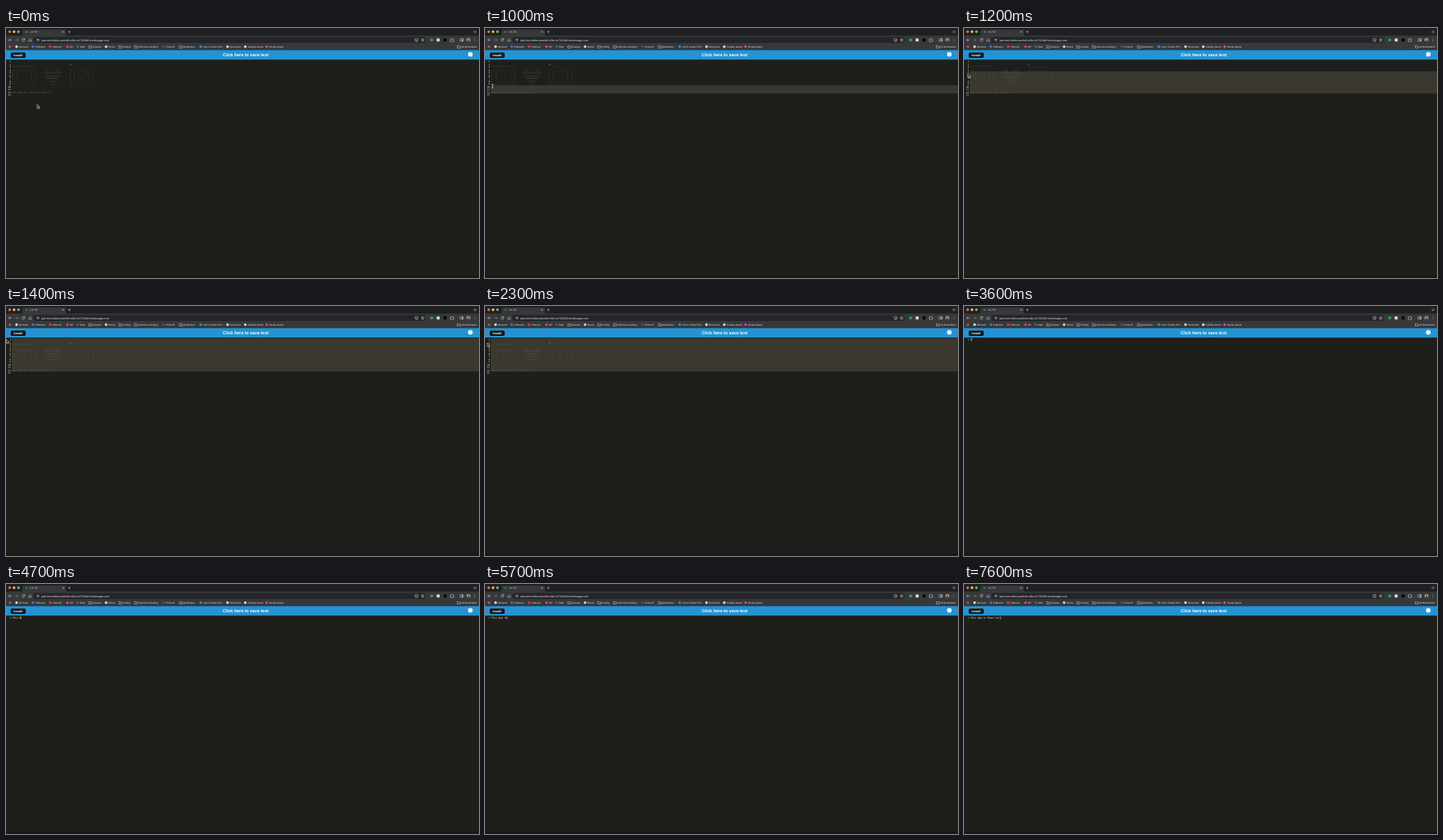
An HTML page for the animation above (8 s loop, 600x318 px).

```html
<!DOCTYPE html>
<html lang="en">
<head>
<meta charset="utf-8">
<title>Text editor</title>
<style>
html, body { margin: 0; width: 100%; height: 100%; overflow: hidden; background: #1e1f1a; }
svg { display: block; width: 100%; height: 100%; }
text { font: 3.1px "Liberation Sans", Arial, sans-serif; fill: #e4e5e7; text-rendering: geometricPrecision; white-space: pre; }
#editor text { font: 3px "DejaVu Sans Mono", monospace; fill: #f8f8f2; }
#editor .num { text-anchor: end; fill: #e2e2dc; }
#editor .art { fill: #61615a; }
#editor .bright { fill: #a9a9a2; }
.line { fill: none; stroke: #cfd0d2; stroke-width: .55; stroke-linecap: round; stroke-linejoin: round; }
</style>
</head>
<body>
<svg viewBox="0 0 600 318" preserveAspectRatio="none">
  <rect width="600" height="318" fill="#1e1f1a"/>

  <g id="editor">
    <rect id="selection" x="7.3" width="592.7" fill="#3a382f"/>
    <g id="welcome"></g>
    <g id="typing">
      <text class="num" x="6.2" y="44.2">1</text>
      <text id="typed" x="8" y="44.2"></text>
      <rect id="caret" y="41.2" width=".55" height="3.5" fill="#f8f8f0"/>
    </g>
  </g>

  <!-- tab strip and toolbar -->
  <rect width="600" height="10" fill="#1f2022"/>
  <rect y="9.6" width="600" height="18.6" fill="#37383a"/>
  <path d="M19 10 Q21 10 21 8 V4 Q21 2 23 2 H74 Q76 2 76 4 V8 Q76 10 78 10 Z" fill="#37383a"/>
  <circle cx="4.7" cy="4.8" r="1.7" fill="#ec6a5e"/>
  <circle cx="10.2" cy="4.8" r="1.7" fill="#f4bf4f"/>
  <circle cx="15.8" cy="4.8" r="1.7" fill="#61c554"/>
  <circle cx="26" cy="4.9" r="1" fill="#6d7f8d"/>
  <text x="30" y="6">J.A.T.E</text>
  <path class="line" d="M71.6 4 l1.7 1.7 m0 -1.7 l-1.7 1.7 M79.1 4.9 h2.4 m-1.2 -1.2 v2.4"/>
  <circle cx="595" cy="4.9" r="2.4" fill="#37383a"/>
  <path class="line" d="M594 4.5 l1 1 l1 -1"/>

  <rect x="34.5" y="11.6" width="498" height="7.4" rx="3.7" fill="#242528"/>
  <circle cx="40.5" cy="15.2" r="2.3" fill="#37383a"/>
  <path class="line" d="M39.4 14.5 h2.2 m-2.2 1.4 h2.2"/>
  <text x="45" y="16.5" style="font-size:3.6px">jate-text-editor-penloft-e2bc1e7322b8.herokuapp.com</text>
  <path class="line" d="M7 15.2 H3.6 m1.5 -1.5 l-1.5 1.5 l1.5 1.5"/>
  <path class="line" d="M12 15.2 h3.4 m-1.5 -1.5 l1.5 1.5 l-1.5 1.5" stroke-opacity=".5"/>
  <path class="line" d="M23.5 14.3 A1.7 1.7 0 1 0 23.7 15.8 M23.7 13.2 v1.3 h-1.3"/>
  <path class="line" d="M29.2 15 l1.5 -1.4 l1.5 1.4 v1.8 h-3 z"/>
  <path class="line" d="M519.3 13.7 h3.2 v2.5 h-3.2 z m.9 3.4 h1.5"/>
  <path class="line" d="M528.6 13.4 l.6 1.2 l1.3 .2 l-1 .9 l.3 1.3 l-1.2 -.6 l-1.2 .6 l.3 -1.3 l-1 -.9 l1.3 -.2 z"/>
  <circle cx="540" cy="15.2" r="1.9" fill="#35a14c"/>
  <rect x="546.3" y="13.3" width="3.8" height="3.8" fill="#d9dadc"/>
  <rect x="555" y="13.2" width="4" height="4" fill="#08090a"/>
  <path class="line" d="M564 14 h1 a.7 .7 0 0 1 1.4 0 h1 v1 a.7 .7 0 0 1 0 1.4 v.8 h-3.4 z"/>
  <path class="line" d="M576.4 13.7 h3.6 v3 h-3.6 z m2.3 0 v3 m.5 -3 v3"/>
  <circle cx="586.6" cy="15.2" r="2.4" fill="#b4b0a8"/>
  <circle cx="586.6" cy="14.5" r=".9" fill="#4c4641"/>
  <path d="M584.8 16.8 a1.8 1.5 0 0 1 3.6 0 a2.4 2.4 0 0 1 -3.6 0" fill="#4c4641"/>
  <g fill="#cfd0d2"><circle cx="594.8" cy="13.8" r=".4"/><circle cx="594.8" cy="15.2" r=".4"/><circle cx="594.8" cy="16.6" r=".4"/></g>
  <g id="bookmarks"></g>

  <!-- page header -->
  <rect y="28.2" width="600" height="12" fill="#2493d4"/>
  <rect x="6" y="31.2" width="19" height="6.7" rx="1.6" fill="#16181a"/>
  <text x="15.5" y="35.8" text-anchor="middle" style="font-size:3.7px;font-weight:bold;fill:#fff">Install!</text>
  <text x="304" y="36.4" text-anchor="middle" style="font-size:5.5px;font-weight:bold;fill:#fff">Click here to save text</text>
  <circle cx="589" cy="33.5" r="3" fill="#e6f2fa"/>
  <rect y="314.6" width="600" height="3.4" fill="#1b1715"/>

  <path id="arrow" d="M0 0 V4.7 L1.1 3.7 L1.9 5.5 L2.7 5.1 L1.9 3.4 H3.4 Z" fill="#111" stroke="#fff" stroke-width=".5"/>
  <path id="beam" class="line" d="M-1 -2.4 Q0 -2.4 0 -1.6 Q0 -2.4 1 -2.4 M0 -1.6 V1.6 M-1 2.4 Q0 2.4 0 1.6 Q0 2.4 1 2.4" style="stroke:#eee"/>
</svg>
<script>
const LOOP = 8000, STEP = 100;
const TOP = 41, LINE = 3.53, CHAR = 1.806, LEFT = 8;
const $ = id => document.getElementById(id);

function add(parent, tag, attrs, content = "") {
  const el = document.createElementNS("http://www.w3.org/2000/svg", tag);
  for (const key in attrs) el.setAttribute(key, attrs[key]);
  el.textContent = content;
  parent.append(el);
}

// icon x, icon kind or colour, label
const bookmarks = [
  [13.4, "#d8d8d8", "Monvelo"], [34, "#2f78e6", "Palhaven"], [56, "#e23b32", "Vidnook"],
  [78, "#dc3f86", "OP"], [91, "#5c5d60", "Mail"], [107, "folder", "Classes"],
  [127, "#d3d4d6", "Movie"], [145, "folder", "Coding"], [165, "folder", "Interview stocking"],
  [200, "#515255", "PenLoft"], [222, "folder", "Quillmates"], [247, "#2c8be0", "Larch Center Pics"],
  [281, "#d3d4d6", "Document"], [303.5, "#d3d4d6", "Sunday Game"], [330.6, "#d044a8", "Orvala Quest"],
  [574.5, "folder", "All Bookmarks"]
];

function drawBookmarks() {
  const g = $("bookmarks");
  add(g, "rect", { x: 3.6, y: 22.4, width: 2.8, height: 2.8, fill: "#b0594f" });
  for (const [x, kind, label] of bookmarks) {
    if (kind === "folder") {
      add(g, "path", { class: "line", d: `M${x - 1.6} 22.5 h1.2 l.5 .5 h1.7 v2.4 h-3.4 z` });
    } else {
      add(g, "circle", { cx: x, cy: 23.8, r: 1.7, fill: kind });
    }
    add(g, "text", { x: x + 3.1, y: 24.9 }, label);
  }
}

const face = [
  "  .-----------.", " / .---------. \\", "|  |  *   *  |  |", "|  |         |  |",
  "|  |   \\_/   |  |", "|  '---------'  |", " \\_____________/", " '-----' '-----'"
];
const heart = ["", " .==.   .==.", "=============", " ===========", "  =========", "    =====", "      =", "--- - - -----"];

function drawWelcome() {
  const g = $("welcome");
  const rows = face.map((f, i) => f.padEnd(22) + heart[i].padEnd(18) + f);
  const lines = ["", "", ...rows, "", "Welcome to Jate Text Editor", ""];
  lines.forEach((line, i) => {
    const y = TOP + i * LINE + 3.1;
    add(g, "text", { class: "num", x: 6.2, y }, i + 1);
    if (line) add(g, "text", { class: "art", x: LEFT, y }, line);
  });
  const y = TOP + LINE + 3.1;
  add(g, "text", { class: "bright", x: LEFT, y }, "_".repeat(15));
  add(g, "text", { class: "bright", x: LEFT + 40 * CHAR, y }, "/*");
  add(g, "text", { class: "art", x: LEFT + 42 * CHAR, y }, "____..");
}

const phrase = "This App is Power by ";
const keys = [3500, 3900, 4000, 4100, 4300, 4700, 5000, 5100, 5300, 5500, 5700,
  5800, 6000, 6100, 6300, 6500, 6700, 6900, 7300, 7500, 7600];
const CLEAR = 2350, DRAG = 700, ALL = 1400, BLINK = 530;

// time, x, y
const path = [
  [0, 39.6, 97.3], [500, 9, 89], [DRAG, 9, 89], [1000, 9.5, 74], [ALL, .5, 42.6],
  [1600, 1, 43.5], [2300, 3, 47], [3000, 0, 50], [3300, 25.5, 58.3], [LOOP, 25.5, 58.3]
];

function mouseAt(t) {
  const i = path.findIndex(p => p[0] > t);
  const [t0, x0, y0] = path[i - 1], [t1, x1, y1] = path[i];
  const k = (t - t0) / (t1 - t0);
  return [x0 + (x1 - x0) * k, y0 + (y1 - y0) * k];
}

function show(id, on) { $(id).style.display = on ? "" : "none"; }

function draw(t) {
  const cleared = t >= CLEAR;
  const [x, y] = mouseAt(t);

  const visible = !cleared || (t >= 3100 && t < 3600);
  const overText = x > 7 && t >= 300 && t < CLEAR;
  show("arrow", visible && !overText);
  show("beam", visible && overText);
  $(overText ? "beam" : "arrow").setAttribute("transform", `translate(${x} ${y})`);

  const first = t >= ALL ? 0 : Math.max(0, Math.floor((y - TOP) / LINE));
  const count = t > DRAG && !cleared ? Math.max(0, 12 - first) : 0;
  $("selection").setAttribute("y", TOP + first * LINE);
  $("selection").setAttribute("height", count * LINE);

  show("welcome", !cleared);
  show("typing", cleared);
  const n = keys.filter(k => k <= t).length;
  const last = n ? keys[n - 1] : CLEAR;
  $("typed").textContent = phrase.slice(0, n);
  $("caret").setAttribute("x", LEFT + n * CHAR - .2);
  show("caret", Math.floor((t - last) / BLINK) % 2 === 0);
}

function tick() {
  const t = performance.now() % LOOP;
  draw(Math.floor(t / STEP) * STEP);
  requestAnimationFrame(tick);
}

drawBookmarks();
drawWelcome();
tick();
</script>
</body>
</html>
```
